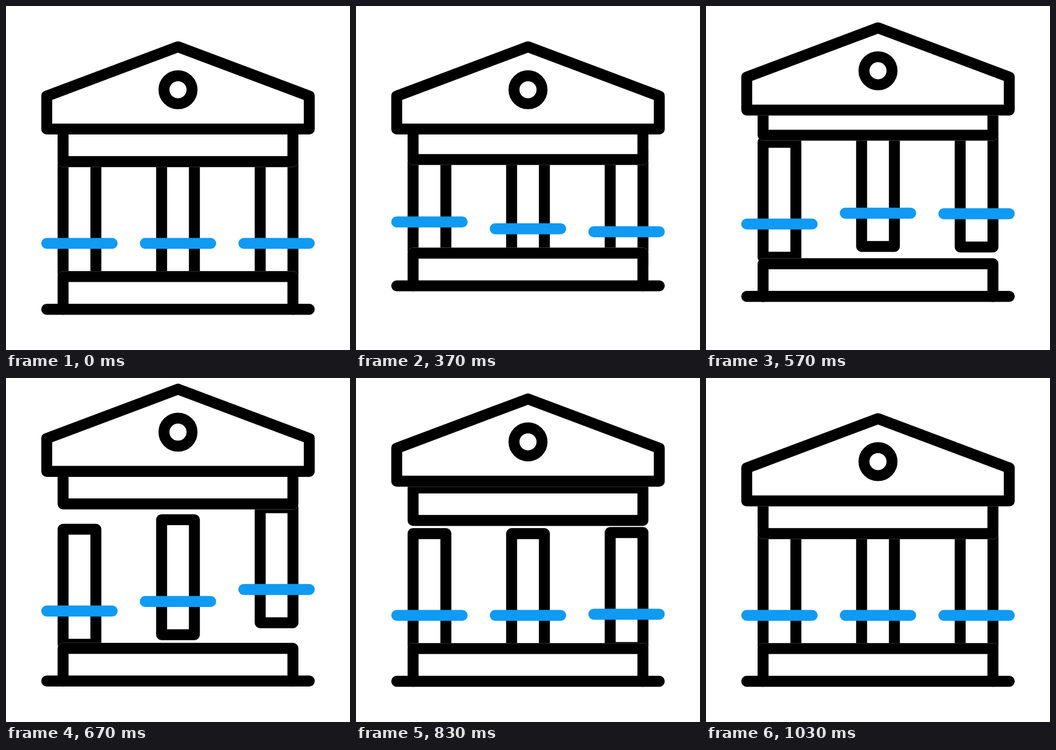
Write an HTML page that moves like this. It is 640x640 px and loops after 1670 ms.

```html
<!DOCTYPE html>
<html lang="en">
<head>
<meta charset="utf-8">
<title>Bouncing bank</title>
<style>
  html, body { margin: 0; width: 100%; height: 100%; overflow: hidden; background: #fff; }
  svg { display: block; width: 100%; height: 100%; }
  path, circle { stroke-width: 20.4; stroke-linecap: round; stroke-linejoin: round; }
  .mask { fill: #fff; stroke: #fff; }
  .ink { fill: none; stroke: #000; }
  .bar { fill: none; stroke: #0f9af4; }
</style>
</head>
<body>
<svg id="stage" viewBox="0 0 640 640"></svg>
<script>
const LOOP = 1670;
const LIFT = 58;
const stage = document.getElementById('stage');

// A white copy below each outline hides whatever stands behind it.
const solid = d => `<path class="mask" d="${d}"/><path class="ink" d="${d}"/>`;

const column = x =>
  solid(`M${x} 289.5h61v214h-61z`) +
  `<path class="bar" d="M${x - 30.4} 441.6h121.7"/>`;

const base =
  solid('M106.2 564.4V503.4H533.8V564.4') +
  '<path class="ink" d="M75.8 564.2H564.2"/>';

const beam = solid('M106.2 228.9H533.8V289.5H106.2z');

const roof =
  solid('M75.8 167.6L320 75.9L564.2 167.6V228.9H75.8z') +
  '<circle class="ink" cx="320" cy="155.8" r="26.1"/>';

// span: rise start, rise end, fall start, fall end, in ticks of 1/30 s
const parts = [
  { art: column(106.2), span: [5.6, 14.2, 13.35, 22.05] },
  { art: column(289.5), span: [5.4, 17.1, 16.25, 23.25] },
  { art: column(472.9), span: [5.5, 18.8, 17.9, 25.9] },
  { art: base, span: [5.6, 13.6, 12.7, 20.4] },
  { art: beam, span: [9.4, 19.5, 18.45, 30.3] },
  { art: roof, span: [11.1, 21.4, 20.6, 31.4] }
];

stage.innerHTML = parts.map(p => `<g>${p.art}</g>`).join('');
parts.forEach((p, i) => { p.node = stage.children[i]; });

function smooth(from, to, x) {
  const s = Math.min(1, Math.max(0, (x - from) / (to - from)));
  return s * s * (3 - 2 * s);
}

function draw(ms) {
  // Pictures advance 30 times a second, on a 10 ms grid.
  const tick = Math.floor((Math.floor(ms / 10) + 0.4) * 0.3);
  for (const { node, span: [a, b, c, d] } of parts) {
    const y = -LIFT * smooth(a, b, tick) * (1 - smooth(c, d, tick));
    node.setAttribute('transform', `translate(0 ${y.toFixed(2)})`);
  }
}

const start = performance.now();
function run() {
  draw((performance.now() - start) % LOOP);
  requestAnimationFrame(run);
}
run();
</script>
</body>
</html>
```
